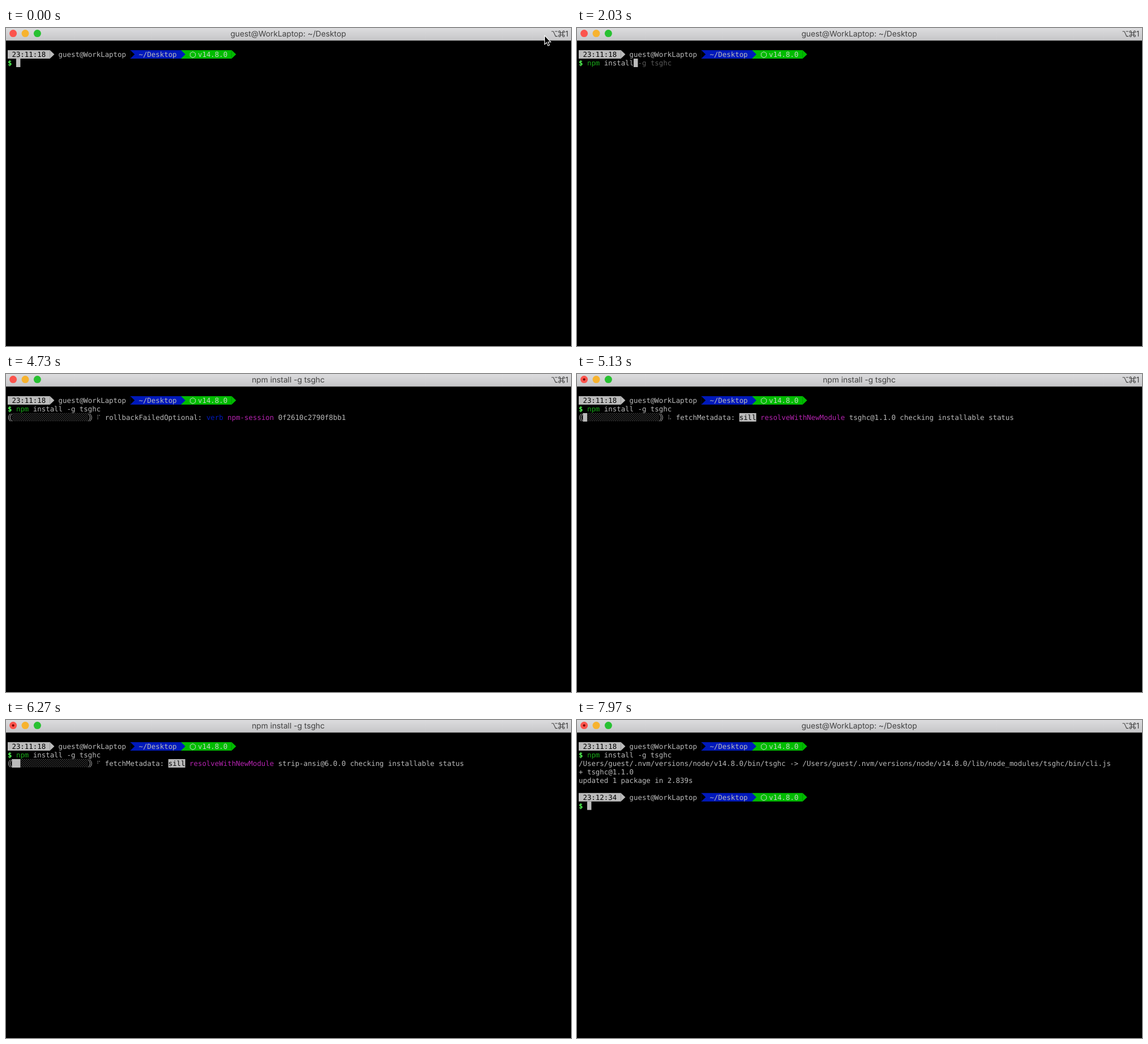
Write an HTML page that moves like this. It is 998 px wide and 561 px high and loops after 8 s.

```html
<!DOCTYPE html>
<html lang="en">
<head>
<meta charset="utf-8">
<title>Terminal install</title>
<style>
  html, body { margin: 0; width: 100%; height: 100%; overflow: hidden; background: #000; }
  svg { display: block; width: 100vw; height: 100vh; }
  text { white-space: pre; text-rendering: geometricPrecision; }
  .mono { font: 12.4px "DejaVu Sans Mono", monospace; }
  .bold { font-weight: 700; }
  .title { font: 13.75px Inter, "Liberation Sans", sans-serif; fill: #414141; }
</style>
</head>
<body>
<svg viewBox="0 0 998 561">
  <defs>
    <linearGradient id="bar" x2="0" y2="1">
      <stop offset="0" stop-color="#dcdcde"/>
      <stop offset="1" stop-color="#c6c6c8"/>
    </linearGradient>
    <pattern id="shade" width="3.73" height="3.73" patternUnits="userSpaceOnUse">
      <path d="M.4 .5h1M2.27 2.4h1" stroke="#a0a0a0"/>
    </pattern>
  </defs>
  <rect width="998" height="561"/>
  <rect width="998" height="22" fill="url(#bar)"/>
  <rect y="21.5" width="998" height=".8" fill="#a5a5a5"/>
  <circle cx="12.6" cy="9.6" r="6.5" fill="#fb544d"/>
  <circle cx="34" cy="9.6" r="6.5" fill="#f7b32f"/>
  <circle cx="55.4" cy="9.6" r="6.5" fill="#28c132"/>
  <g fill="none" stroke="#414141" stroke-width="1.1">
    <path d="M963.5 6h3.3l4 8.6h3.4M969.6 6h4.6"/>
    <path d="M979.3 8.3h4v4h-4zM979.3 8.3h-1.5a1.6 1.6 0 1 1 1.5-1.6zM983.3 8.3v-1.6a1.6 1.6 0 1 1 1.5 1.6zM983.3 12.3h1.5a1.6 1.6 0 1 1-1.5 1.6zM979.3 12.3v1.6a1.6 1.6 0 1 1-1.5-1.6z"/>
  </g>
  <text class="title" x="987.8" y="15">1</text>
  <g id="screen"></g>
</svg>
<script>
const LOOP = 8000, LEFT = 3, TOP = 39.1, CELL = 7.466, ROW = 14.95;
const GREY = '#bbb', BLUE = '#0019bb', GREEN = '#00bb00', MAGENTA = '#b523b0';
const COMMAND = 'npm install -g tsghc';
const HOME = '/Users/guest/.nvm/versions/node/v14.8.0/';
const KEYS = [600, 750, 900, 1080, 1230, 1350, 1480, 1600, 1730, 1850,
  1980, 2200, 2450, 2650, 2850, 3050, 3250, 3430, 3620, 3900];
const ENTER = 4250, PROGRESS = 4480, EDITED = 4900, DONE = 7340, PROMPT = 7560;

// time, filled cells, stage, log level, log source, detail
const fetching = (time, cells, module) =>
  [time, cells, 'fetchMetadata:', 'sill', 'resolveWithNewModule', module + ' checking installable status'];
const STAGES = [
  [PROGRESS, 0, 'rollbackFailedOptional:', 'verb', 'npm-session', '0f2610c2790f8bb1'],
  fetching(5130, 1, 'tsghc@1.1.0'),
  fetching(5300, 2, 'commander@6.2.0'),
  fetching(5460, 2, 'onetime@5.1.2'),
  fetching(5600, 2, 'mimic-fn@2.1.0'),
  fetching(5860, 2, 'cli-cursor@3.1.0'),
  fetching(6120, 2, 'strip-ansi@6.0.0'),
  fetching(6380, 3, 'find-up@2.1.0'),
  fetching(6600, 3, 'locate-path@2.0.0'),
  fetching(6790, 3, 'p-limit@1.3.0'),
  fetching(6950, 3, 'p-try@1.0.0'),
  [7130, 8, 'extract:tsghc:', 'sill', 'extract', 'tsghc@1.1.0'],
  [7230, 15, 'finalize:tsghc:', 'sill', 'finalize', 'tsghc@1.1.0'],
];
const SPINNER = '⠋⠙⠹⠸⠼⠴⠦⠧⠇⠏';

const colX = col => LEFT + col * CELL;
const rowY = row => TOP + row * ROW;
const put = (col, row, str, fill = GREY, cls = '') =>
  `<text class="mono ${cls}" x="${colX(col)}" y="${rowY(row) + 11.9}" fill="${fill}">${str}</text>`;
const box = (col, row, cells, fill = GREY) =>
  `<rect x="${colX(col)}" y="${rowY(row)}" width="${cells * CELL}" height="${ROW}" fill="${fill}"/>`;
const arrow = (col, row, fill) =>
  `<path d="M${colX(col) - .1} ${rowY(row)}l${CELL + .4} ${ROW / 2}l${-CELL - .4} ${ROW / 2}z" fill="${fill}"/>`;

function prompt(row, clock) {
  const x = colX(43) + 5.9, y = rowY(row) + 8.1;
  return box(0, row, 10) + arrow(10, row, GREY) + put(1, row, clock, '#000') +
    put(12, row, 'guest@WorkLaptop') +
    box(29, row, 12, BLUE) + arrow(29, row, '#000') + put(31, row, '~/Desktop') +
    box(41, row, 12, GREEN) + arrow(41, row, BLUE) + arrow(53, row, GREEN) +
    `<path d="M${x} ${y - 5.3}l4.6 2.65v5.3l-4.6 2.65l-4.6-2.65v-5.3z" fill="none" stroke="#c4d8c4"/>` +
    put(45, row, 'v14.8.0', '#c4d8c4') +
    put(0, row + 1, '$', '#55ff55', 'bold');
}

function commandLine(typed, running) {
  const known = typed >= 3;
  let out = put(2, 1, COMMAND.slice(0, Math.min(typed, 3)),
    known ? '#18a818' : '#ff5555', known ? '' : 'bold');
  if (typed > 3) out += put(5, 1, COMMAND.slice(3, typed));
  if (running) return out;
  if (typed) out += put(2 + typed, 1, COMMAND.slice(typed), '#585858');
  out += box(2 + typed, 1, 1);
  if (typed && typed < COMMAND.length) out += put(2 + typed, 1, COMMAND[typed], '#f0f0f0');
  return out;
}

function spinner(t) {
  const step = Math.floor((t - 4730) / 50 + .5) + 9;
  const bits = SPINNER.charCodeAt(((step % 10) + 10) % 10) - 0x2800;
  let out = '';
  for (let i = 0; i < 6; i++) {
    if (bits >> i & 1) {
      const x = colX(21) + 2.3 + (i > 2 ? 3 : 0), y = rowY(2) + 3.9 + i % 3 * 3;
      out += `<rect x="${x - .6}" y="${y - .6}" width="1.3" height="1.3" fill="${GREY}"/>`;
    }
  }
  return out;
}

function progress(t) {
  const [, cells, stage, level, source, detail] = STAGES.filter(s => s[0] <= t).pop();
  const levelCol = 23 + stage.length + 1;
  const sourceCol = levelCol + level.length + 1;
  const silly = level === 'sill';
  const end = colX(19);
  return `<path d="M7.6 70.2q-6.6 6.6 0 13.2M10.4 70.2q-6.6 6.6 0 13.2` +
    `M${end + .5} 70.2q6.6 6.6 0 13.2M${end + 3.3} 70.2q6.6 6.6 0 13.2" fill="none" stroke="${GREY}"/>` +
    box(1, 2, 18, 'url(#shade)') + box(1, 2, cells) + spinner(t) + put(23, 2, stage) +
    (silly ? box(levelCol, 2, 4) : '') + put(levelCol, 2, level, silly ? '#000' : BLUE) +
    put(sourceCol, 2, source, MAGENTA) +
    put(sourceCol + source.length + 1, 2, detail);
}

const pointer = '<path d="M951.4 13.3v15.6l3.5-3.3l2.5 5.8l2.6-1.1l-2.5-5.6h4.7z" fill="#000" stroke="#fff" stroke-width="1.1"/>';

function draw(t) {
  const typed = KEYS.filter(k => k <= t).length;
  const running = t >= ENTER && t < PROMPT;
  const title = running ? COMMAND : 'guest@WorkLaptop: ~/Desktop';
  let out = `<text class="title" x="498.5" y="15" text-anchor="middle">${title}</text>` +
    prompt(0, '23:11:18') + commandLine(typed, t >= ENTER);
  if (!typed) out += pointer;
  if (t >= EDITED) out += '<circle cx="12.6" cy="9.6" r="2.1" fill="#730805"/>';
  if (t >= ENTER && t < PROGRESS) out += box(0, 2, 1);
  if (t >= PROGRESS && t < DONE) out += progress(t);
  if (t >= DONE) {
    out += put(0, 2, `${HOME}bin/tsghc -&gt; ${HOME}lib/node_modules/tsghc/bin/cli.js`) +
      put(0, 3, '+ tsghc@1.1.0') + put(0, 4, 'updated 1 package in 2.839s');
    out += t < PROMPT ? box(0, 5, 1) : prompt(6, '23:12:34') + box(2, 7, 1);
  }
  return out;
}

const screen = document.getElementById('screen');
const start = performance.now();
let shown = '';
function tick() {
  const next = draw((performance.now() - start) % LOOP);
  if (next !== shown) screen.innerHTML = shown = next;
  requestAnimationFrame(tick);
}
tick();
</script>
</body>
</html>
```
